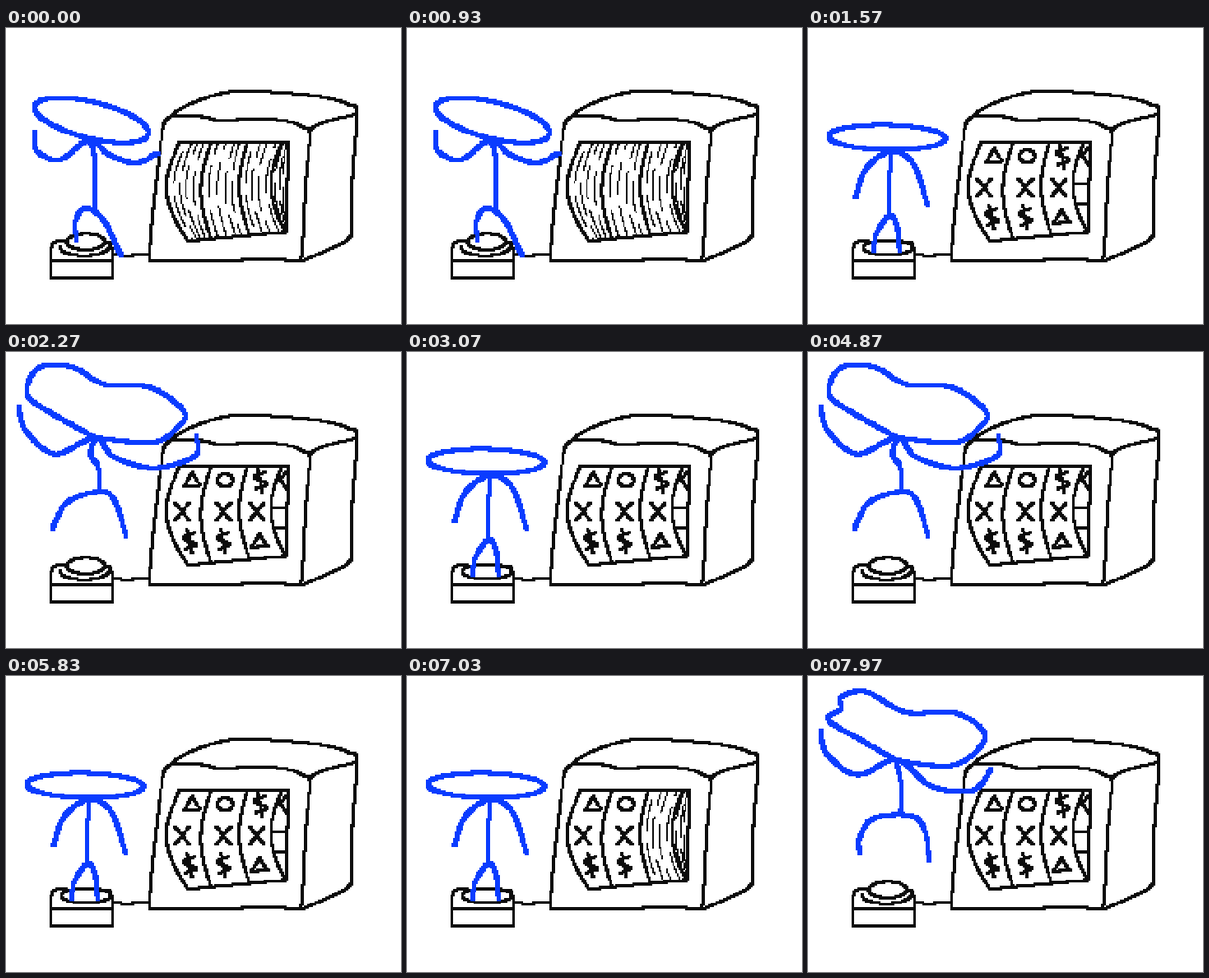
Write an HTML page with a canvas that moves like this. It is 480x360 px and loops after 8 s.

```html
<!DOCTYPE html>
<html lang="en">
<head>
<meta charset="utf-8">
<title>Slot machine doodle</title>
<style>
html, body { margin: 0; width: 100%; height: 100%; overflow: hidden; background: #fff; }
canvas { display: block; width: 480px; height: 360px; image-rendering: pixelated; }
</style>
</head>
<body>
<canvas id="stage" width="256" height="192"></canvas>
<script>
const ctx = document.getElementById('stage').getContext('2d');
const SCALE = 480 / 256;
const LOOP = 8000, ROUND = 1400, CHEER = 100;
const BLACK = '#0c0c0c', BLUE = '#0a3cff';
const { PI, sin, cos, round } = Math;

const lerp = (a, b, u) => a + (b - a) * u;
const spline = (a, b, c, d, u) =>
  b + 0.5 * u * (c - a + u * (2 * a - 5 * b + 4 * c - d + u * (3 * (b - c) + d - a)));

// Stamps a square brush along a smooth curve through x, y, x, y ... in stage pixels.
// keep() may leave gaps.
function stroke(points, brush, color, keep = () => true) {
  ctx.fillStyle = color;
  const last = points.length / 2 - 1;
  const at = (i, axis) => points[2 * Math.max(0, Math.min(last, i)) + axis];
  for (let i = 0; i < last; i++) {
    const steps = Math.ceil(Math.hypot(at(i + 1, 0) - at(i, 0), at(i + 1, 1) - at(i, 1)));
    for (let s = 0; s <= steps; s++) {
      if (!keep()) continue;
      const [x, y] = [0, 1].map(axis => round(
        spline(at(i - 1, axis), at(i, axis), at(i + 1, axis), at(i + 2, axis), s / steps) / SCALE - brush / 2));
      ctx.fillRect(x, y, brush, brush);
    }
  }
}
const ink = (...points) => stroke(points, 2, BLACK);
const paint = (...points) => stroke(points, 3, BLUE);

const sample = (at, steps = 16) =>
  Array.from({ length: steps + 1 }, (_, i) => at(i / steps)).flat();

const ellipse = (cx, cy, rx, ry, tilt = 0, from = 0, to = 2 * PI) => sample(u => {
  const a = lerp(from, to, u), x = rx * cos(a), y = ry * sin(a);
  return [cx + x * cos(tilt) - y * sin(tilt), cy + x * sin(tilt) + y * cos(tilt)];
}, 24);

function polygon(...p) {
  for (let i = 0; i < p.length; i += 2)
    ink(p[i], p[i + 1], p[(i + 2) % p.length], p[(i + 3) % p.length]);
}

function drawCabinet() {
  ink(174,283, 178,230, 188,140, 193,115, 204,107, 240,108, 262,113, 300,110, 340,113, 362,121,
      369,130, 364,190, 360,270, 357,283);
  ink(174,283, 265,284, 300,281, 357,283);
  ink(200,107, 222,93, 264,79, 306,77, 379,83, 417,93, 426,105, 421,180, 420,235, 414,258, 358,284);
  ink(368,125, 385,115, 425,105);
  ink(131,275, 145,277, 174,275);
}

function drawButton(pressed) {
  polygon(54,284, 130,284, 130,303, 54,303);
  ink(55,284, 57,262, 73,259);
  ink(121,260, 128,265, 130,284);
  if (pressed) return ink(...ellipse(97, 267, 30, 9));
  ink(...ellipse(97, 260, 23, 10));
  ink(...ellipse(95, 266, 30, 11, 0, 0, PI));
}

// Bowed edges of the drums from left to right: top x, bottom x, bulge to the left.
const edges = [[211, 221, 21], [249, 249, 12], [293, 296, 11], [335, 339, 15], [343, 341, 0]];

function edgeCurve(position) {
  const i = Math.min(3, Math.floor(position));
  const [top, bottom, bulge] = edges[i].map((v, k) => lerp(v, edges[i + 1][k], position - i));
  return sample(v => [lerp(top, bottom, v) - bulge * sin(PI * v), lerp(139, 279 - bottom * 0.09, v)], 8);
}

function drawWindow() {
  for (let i = 0; i < edges.length; i++) ink(...edgeCurve(i));
  ink(211,139, 343,139);
  ink(221,259, 341,248);
}

const cross = (x, y) => {
  ink(x - 9, y - 10, x + 9, y + 12);
  ink(x + 9, y - 10, x - 9, y + 12);
};
const ring = (x, y) => ink(...ellipse(x, y, 9, 8));
const triangle = (x, y) => polygon(x, y - 9, x - 10, y + 8, x + 10, y + 6);
const dollar = (x, y) => {
  ink(...sample(u => [x + 8 * sin(PI * (2.5 * u - 1.25)), y + lerp(-10, 10, u)]));
  ink(x - 3, y - 14, x + 3, y + 14);
};

const reels = [
  { x: [226, 214, 223], faces: [triangle, cross, dollar] },
  { x: [266, 264, 264], faces: [ring, cross, dollar] },
  { x: [309, 305, 308], faces: [dollar, cross, triangle] }
];

function drawStoppedReel({ x, faces }) {
  faces.forEach((face, row) => face(x[row], 156 + 37 * row));
}

function drawFarStrip() {
  ink(322,190, 341,190);
  ink(324,214, 341,213);
  ink(330,152, 341,166);
  ink(334,153, 341,146);
}

function random(seed) {
  const v = sin(seed * 12.9898) * 43758.5453;
  return v - Math.floor(v);
}

function drawBlur(reel, lines) {
  for (let n = 1; n <= lines; n++) {
    const seed = reel * 20 + n;
    let step = round(random(seed) * 50);
    const wobble = (random(seed + 0.5) - 0.5) * 0.5;
    const points = edgeCurve(reel + (n + wobble) / (lines + 1));
    stroke(points, 1, BLACK, () => step++ % 60 < 44);
  }
}

const poses = {
  waiting() {
    paint(...ellipse(104, 112, 71, 22, 0.24));
    paint(34,127, 38,150, 66,160, 101,136, 125,154, 158,164, 184,152);
    paint(101,136, 107,155, 107,219);
    paint(86,257, 84,236, 96,219, 118,233, 139,276);
  },
  pressing() {
    paint(...ellipse(96, 133, 71, 15, 0.02));
    paint(58,206, 70,172, 100,150, 128,165, 145,215);
    paint(100,150, 98,228);
    paint(79,270, 84,248, 99,228, 108,241, 111,271);
  },
  cheerLeft() {
    paint(108,104, 48,70, 25,50, 40,19, 80,18, 119,39, 175,43, 216,72, 208,92, 178,110, 108,104);
    paint(15,67, 25,97, 60,124, 108,104, 130,127, 180,141, 230,126, 231,102);
    paint(108,104, 103,125, 112,140, 113,170);
    paint(57,214, 75,182, 115,170, 132,181, 146,224);
  },
  cheerRight() {
    paint(108,103, 70,81, 25,54, 40,40, 40,26, 70,19, 119,44, 180,45, 215,74, 178,108, 108,103);
    paint(15,67, 23,95, 60,120, 108,102, 150,134, 200,139, 222,114);
    paint(107,103, 114,138, 112,168);
    paint(63,214, 62,198, 80,173, 125,170, 142,188, 147,224);
  }
};

// The first round is a long wait; later rounds press, win and cheer.
function stateAt(t) {
  const p = t % ROUND;
  if (t < 1150) return { pose: 'waiting', stopped: 0 };
  if (p < 600) return { pose: 'pressing', stopped: p < 120 ? 2 : 3 };
  if (p < 1150) return { pose: Math.floor(p / CHEER) % 2 ? 'cheerRight' : 'cheerLeft', stopped: 3 };
  if (p < 1260) return { pose: 'waiting', stopped: 0 };
  return { pose: 'pressing', stopped: p < 1330 ? 1 : 2 };
}

function draw(t) {
  const { pose, stopped } = stateAt(t);
  ctx.fillStyle = '#fff';
  ctx.fillRect(0, 0, 256, 192);
  drawCabinet();
  drawWindow();
  reels.forEach((reel, i) => i < stopped ? drawStoppedReel(reel) : drawBlur(i, 4));
  if (stopped === 3) drawFarStrip();
  else drawBlur(3, 3);
  drawButton(pose === 'pressing');
  poses[pose]();
}

const start = performance.now();
function tick() {
  draw((performance.now() - start) % LOOP);
  requestAnimationFrame(tick);
}
tick();
</script>
</body>
</html>
```
